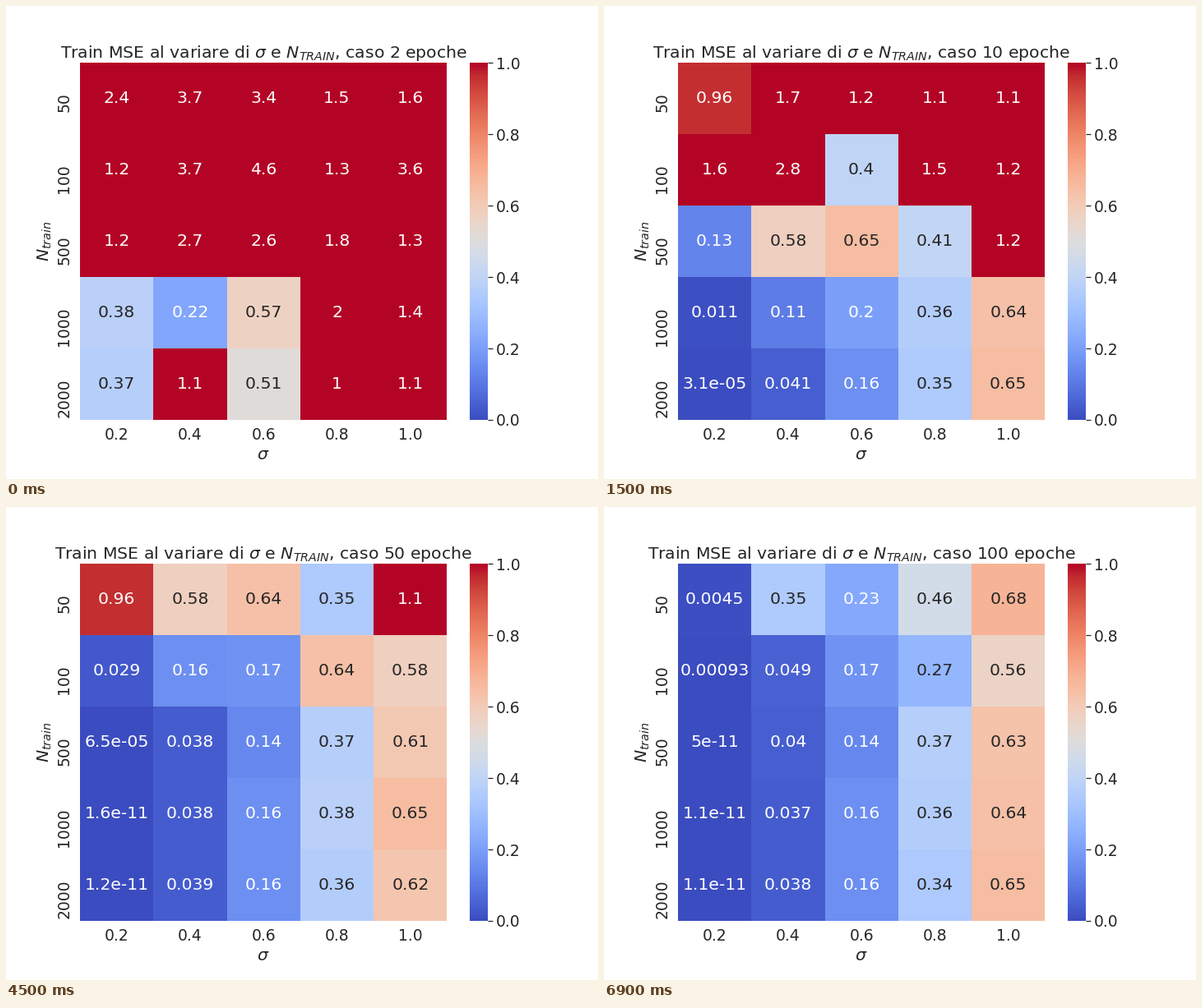
Write a matplotlib script that moves like this. It is 720 px wide and 576 px high and loops after 7.5 s.

```python
import matplotlib.pyplot as plt
import numpy as np
from matplotlib.animation import FuncAnimation

SCALE = 1.7
INK = "0.15"

plt.rcParams.update({
    "font.family": "DejaVu Sans",
    "mathtext.fontset": "dejavusans",
    "font.size": 12 * SCALE,
    "axes.titlesize": 12 * SCALE,
    "axes.labelsize": 12 * SCALE,
    "xtick.labelsize": 11 * SCALE,
    "ytick.labelsize": 11 * SCALE,
    "text.color": INK,
    "axes.labelcolor": INK,
    "xtick.color": INK,
    "ytick.color": INK,
    "xtick.major.size": 6,
    "ytick.major.size": 6,
    "xtick.major.width": 1.25,
    "ytick.major.width": 1.25,
})

SIGMAS = ["0.2", "0.4", "0.6", "0.8", "1.0"]
SIZES = ["50", "100", "500", "1000", "2000"]

# Train MSE by number of epochs: rows are training sizes, columns are sigmas.
RUNS = {
    2: """2.4 3.7 3.4 1.5 1.6
          1.2 3.7 4.6 1.3 3.6
          1.2 2.7 2.6 1.8 1.3
          0.38 0.22 0.57 2 1.4
          0.37 1.1 0.51 1 1.1""",
    10: """0.96 1.7 1.2 1.1 1.1
           1.6 2.8 0.4 1.5 1.2
           0.13 0.58 0.65 0.41 1.2
           0.011 0.11 0.2 0.36 0.64
           3.1e-05 0.041 0.16 0.35 0.65""",
    20: """2.4 0.28 1.9 2.6 1.3
           0.79 0.097 0.63 0.41 2.2
           0.035 0.066 0.18 0.37 0.63
           0.00017 0.045 0.17 0.39 0.68
           1.1e-07 0.041 0.16 0.35 0.65""",
    50: """0.96 0.58 0.64 0.35 1.1
           0.029 0.16 0.17 0.64 0.58
           6.5e-05 0.038 0.14 0.37 0.61
           1.6e-11 0.038 0.16 0.38 0.65
           1.2e-11 0.039 0.16 0.36 0.62""",
    100: """0.0045 0.35 0.23 0.46 0.68
            0.00093 0.049 0.17 0.27 0.56
            5e-11 0.04 0.14 0.37 0.63
            1.1e-11 0.037 0.16 0.36 0.64
            1.1e-11 0.038 0.16 0.34 0.65""",
}
EPOCHS = list(RUNS)
GRIDS = [np.array(rows.split(), float).reshape(5, 5) for rows in RUNS.values()]


def luminance(rgba):
    rgb = np.asarray(rgba[:3])
    linear = np.where(rgb <= 0.03928, rgb / 12.92, ((rgb + 0.055) / 1.055) ** 2.4)
    return linear @ [0.2126, 0.7152, 0.0722]


fig, ax = plt.subplots(
    figsize=(10, 8), dpi=72, facecolor="white",
    gridspec_kw=dict(left=0.125, right=0.9, bottom=0.125, top=0.88))

mesh = ax.pcolormesh(GRIDS[0], cmap="coolwarm", vmin=0, vmax=1)
ax.set(xlim=(0, 5), ylim=(5, 0), xlabel=r"$\sigma$", ylabel=r"$N_{train}$")
ax.set_xticks(np.arange(5) + 0.5, SIGMAS)
ax.set_yticks(np.arange(5) + 0.5, SIZES, rotation=90)
ax.tick_params(left=False, bottom=False)
ax.spines[:].set_visible(False)

bar = fig.colorbar(mesh, ax=ax)
bar.outline.set_linewidth(0)
bar.set_ticks(np.linspace(0, 1, 6))

title = ax.set_title("")
labels = [ax.text(col + 0.5, row + 0.5, "", ha="center", va="center")
          for row in range(5) for col in range(5)]


def update(i):
    grid = GRIDS[i]
    mesh.set_array(grid)
    for label, value in zip(labels, grid.flat):
        light = luminance(mesh.cmap(mesh.norm(value))) > 0.408
        label.set_text(f"{value:.2g}")
        label.set_color(INK if light else "white")
    title.set_text(r"Train MSE al variare di $\sigma$ e $N_{TRAIN}$, "
                   f"caso {EPOCHS[i]} epoche")
    return [mesh, title, *labels]


anim = FuncAnimation(fig, update, frames=len(GRIDS), interval=1500,
                     repeat=True, repeat_delay=0, blit=False)
plt.show()
```
